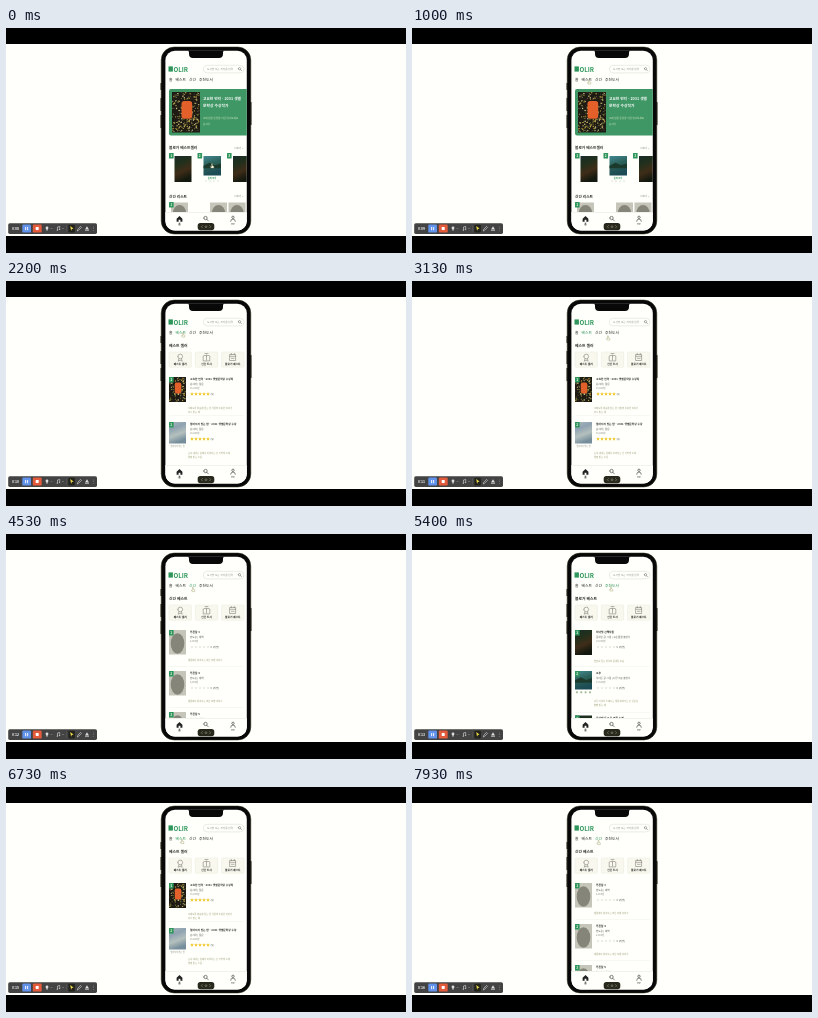
An HTML page that plays this animation: 400 px wide and 225 px high, repeating every 8000 ms.

```html
<!DOCTYPE html>
<html lang="ko">
<head>
<meta charset="utf-8">
<style>
html, body { margin: 0; width: 100%; height: 100%; overflow: hidden; background: #000; }
svg { display: block; width: 100vw; height: 100vh; font-family: "Noto Sans CJK KR", "Noto Sans CJK", "Noto Sans", sans-serif; }
</style>
</head>
<body>
<svg id="stage" viewBox="0 0 400 225"></svg>
<script>
const LOOP = 8000, PAPER = '#fffffb', INK = '#2b2b29', GREY = '#85857c', GREEN = '#2e965a';
const stage = document.getElementById('stage');

const rect = (x, y, w, h, fill, r = 0, extra = '') =>
  `<rect x="${x}" y="${y}" width="${w}" height="${h}" rx="${r}" fill="${fill}" ${extra}/>`;
const circle = (x, y, r, fill, extra = '') =>
  `<circle cx="${x}" cy="${y}" r="${r}" fill="${fill}" ${extra}/>`;
const line = (d, color = INK, width = .6) =>
  `<path d="${d}" fill="none" stroke="${color}" stroke-width="${width}" stroke-linecap="round" stroke-linejoin="round"/>`;
const text = (x, y, size, str, fill = INK, weight = 400, anchor = 'start') =>
  `<text x="${x}" y="${y}" font-size="${size}" fill="${fill}" font-weight="${weight}" text-anchor="${anchor}">${str}</text>`;
const group = (id, body, extra = '') => `<g id="${id}" ${extra}>${body}</g>`;
const magnifier = (x, y, r, color, width) =>
  line(`M${x - r} ${y}a${r} ${r} 0 1 0 ${2 * r} 0a${r} ${r} 0 1 0 ${-2 * r} 0M${x + r * .7} ${y + r * .7}l${r} ${r}`, color, width);

let seed = 7;
const random = () => (seed = seed * 16807 % 2147483647) / 2147483647;

// Book covers
function flowers(x, y, w, h) {
  let s = rect(x, y, w, h, '#1d1b13');
  for (let i = 0; i < w * h / 4; i++)
    s += circle(x + .6 + random() * (w - 1.2), y + .6 + random() * (h - 1.2), .3 + random() * .45,
      ['#b89c3d', '#71713b', '#d3c68b'][i % 3]);
  return s + rect(x + w * .34, y + h * .22, w * .38, h * .44, '#e3602a', w * .1);
}
const dusk = (x, y, w, h) => rect(x, y, w, h, 'url(#dusk)');
const lake = (x, y, w, h) => rect(x, y, w, h, 'url(#lake)') +
  `<path d="M${x} ${y + h * .5}l${w * .35} ${-h * .16}l${w * .3} ${h * .14}l${w * .35} ${-h * .1}v${h * .25}h${-w}z" fill="#1c3a2c"/>`;
const mist = (x, y, w, h) => rect(x, y, w, h, 'url(#mist)');
const sketch = (x, y, w, h) => rect(x, y, w, h, '#c5c5b9') +
  `<ellipse cx="${x + w * .5}" cy="${y + h * .55}" rx="${w * .4}" ry="${h * .42}" fill="#85857a"/>`;
const badge = (x, y, n) => rect(x, y, 4.6, 5.4, GREEN, .5) + text(x + 2.3, y + 4, 3.2, n, '#fff', 700, 'middle');

const star = (x, y, r) => {
  let d = '';
  for (let i = 0; i < 10; i++) {
    const a = i * Math.PI / 5, q = i % 2 ? r * .45 : r;
    d += `${i ? 'L' : 'M'}${(x + q * Math.sin(a)).toFixed(2)} ${(y - q * Math.cos(a)).toFixed(2)}`;
  }
  return d + 'z';
};
const stars = (y, full) => [0, 1, 2, 3, 4].map(i =>
  `<path d="${star(186 + i * 4, y, full ? 2 : 1.6)}" fill="${full ? '#f0ca32' : '#e6e6dc'}"/>`).join('');

// One row of a book list
function item(y, n, cover, coverHeight, title, author, price, full, notes, noteY) {
  return cover(163, y, 17, coverHeight) + badge(163, y, n) +
    text(184, y + 3.2, 2.7, title, INK, 700) +
    text(184, y + 7.8, 2.5, author, '#4c4c46') +
    text(184, y + 12.2, 2.4, price, GREY) +
    stars(y + 17, full) +
    text(204.5, y + 18, 2.6, full ? '(5)' : '0 (리뷰)', '#4c4c46') +
    notes.map((s, i) => text(182, noteY + i * 4, 2.3, s, '#97976f')).join('');
}
const divider = y => rect(163, y, 75, .3, '#e8e8de');

function filters() {
  const names = ['베스트 셀러', '신간 도서', '블로거 베스트'];
  return names.map((name, i) => {
    const x = 163 + i * 26.3, c = x + 11.2;
    const icon = [
      line(`M${c - 2.4} 75.5a2.4 2.4 0 1 0 4.8 0a2.4 2.4 0 1 0 -4.8 0M${c - 1.3} 78l-.7 2.2l2 -.9l2 .9l-.7 -2.2`, '#77776e', .55),
      line(`M${c} 74v5M${c - 3.3} 79.5v-4.5q2 -1.5 3.3 0q1.3 -1.5 3.3 0v4.5zM${c - 1.5} 72.5h3`, '#77776e', .55),
      line(`M${c - 2.8} 73.5h5.6v6h-5.6zM${c - 2.8} 75.3h5.6M${c - 1.4} 77.3h2.8M${c - 1.5} 72.4v1M${c + 1.5} 72.4v1`, '#77776e', .55)
    ][i];
    return rect(x, 71, 22.4, 15.2, '#f8f8ee', 1, 'stroke="#e6e6d8" stroke-width=".4"') + icon +
      text(c, 84.4, 2.7, name, INK, 600, 'middle');
  }).join('');
}
const listPage = (title, body) => text(163, 66.4, 3.8, title, INK, 700) + filters() + body;

const home =
  rect(163, 61, 80, 46.5, '#3f9765', 2) + flowers(166, 64, 28, 40.5) +
  text(197, 72.4, 3.7, '고요한 언덕 - 2031 샛별', '#fff', 700) +
  text(197, 78.8, 3.8, '문학상 수상작가', '#fff', 700) +
  text(197, 91.2, 2.5, '오래 남을 문장을 지금 만나보세요', '#dcecc0') +
  text(197, 97.4, 2.4, '윤서하', '#dcecc0') +
  text(163, 121, 3.7, '블로거 베스트셀러', INK, 700) + text(228.5, 120.6, 2.5, '더보기 &gt;', GREY) +
  dusk(168.5, 128, 17, 26) + badge(163, 125, 1) +
  lake(197.5, 128, 17.5, 19.5) + badge(191.5, 125, 2) +
  text(206, 150.7, 2.2, '숲의 오후', GREEN, 600, 'middle') +
  [200, 204, 208, 212].map(x => circle(x, 153, .6, '#b5c4a8')).join('') +
  dusk(227, 128, 17, 26) + badge(221, 125, 3) +
  text(163, 169.6, 3.7, '신간 리스트', INK, 700) + text(228.5, 169.2, 2.5, '더보기 &gt;', GREY) +
  [165, 204, 222.5].map(x => sketch(x, 174.5, 17, 20)).join('') + badge(163, 174, 1);

const best = listPage('베스트 셀러',
  item(96, 1, flowers, 25, '고요한 언덕 - 2031 샛별문학상 수상작', '윤서하 | 달문', '15,000원', true,
    ['오래도록 마음에 남는 한 사람의 조용한 이야기', '다시 읽는 책'], 127.8) + divider(134.5) +
  item(141, 2, mist, 21.5, '멀어지지 않는 밤 - 2031 샛별문학상 수상', '윤서하 | 달문', '16,800원', true,
    ['눈이 내리는 섬에서 이어지는 긴 기억의 노래', '밤에 읽는 소설'], 172.8) +
  text(171.5, 165.5, 2, '멀어지지 않는 밤', GREY, 400, 'middle'));

const fresh = listPage('신간 베스트', [0, 1, 2].map(i =>
  item(96 + i * 41, i + 1, sketch, 24.5, `푸른달 ${i + 3}`, '한도윤 | 새벽', '6,000원', false,
    ['계절마다 찾아오는 작은 모험 이야기'], 127 + i * 41) + divider(132.5 + i * 41)).join(''));

const picks = listPage('블로거 베스트',
  item(96, 1, dusk, 25, '저녁빛 산책자들', '문하린 글 그림 | 고운물결 출판사', '14,000원', false,
    ['천천히 걷는 하루의 풍경들 모음'], 127.5) + divider(132.5) +
  item(137, 2, lake, 18.5, '오후', '서이든 글 그림 | 나무그늘 출판사', '13,500원', false,
    ['나무 사이로 스며드는 빛을 따라가는 긴 산문집', '함께 읽는 책'], 168.3) +
  [165, 169.3, 173.6, 178].map(x => circle(x, 158.3, 1.1, '#a5b998')).join('') +
  divider(178) + item(181.5, 3, dusk, 20, '강가에 두고 온 여름 노래', '', '', false, [], 220));

const tabs = [['홈', 163], ['베스트', 169.5], ['신간', 183], ['추천도서', 193]];
const header =
  rect(162.5, 38.4, 4.4, 5.2, GREEN) + text(167.4, 43.6, 6.2, 'OLIR', GREEN, 900) +
  rect(197.3, 37.3, 40.7, 7.6, PAPER, 3.8, 'stroke="#d9d9cf" stroke-width=".5"') +
  text(201, 42.2, 2.6, '도서명 또는 저자를 입력', '#96968c') + magnifier(233.5, 40.7, 1.2, '#66665f', .5) +
  tabs.map(([name, x], i) =>
    `<text id="tab${i}" x="${x}" y="52.9" font-size="3.8" font-weight="500">${name}</text>`).join('');

const footer = rect(159, 184, 83, 20, PAPER) + rect(160, 184, 81, .4, '#deded4') +
  '<path d="M170.6 190.8l2.9 -2.8l2.9 2.8v3h-2v-2h-1.8v2h-2z" fill="#222"/>' +
  text(173.5, 197.4, 2.7, '홈', INK, 600, 'middle') +
  magnifier(199.5, 190, 1.7, '#333', .6) +
  circle(227, 189.3, 1.2, 'none', 'stroke="#333" stroke-width=".6"') + line('M224.7 193.3q0 -2.2 2.3 -2.2t2.3 2.2', '#333') +
  text(227, 197.2, 2.7, 'MY', INK, 500, 'middle');

const sideButtons = [[154.5, 55, 7], [154.5, 70, 13], [154.5, 87, 13], [243.8, 74, 23]];
const phone = sideButtons.map(([x, y, h]) => rect(x, y, 1.7, h, '#23231a', .6)).join('') +
  rect(155.2, 19, 89.6, 187, '#080808', 13, 'stroke="#33331f" stroke-width=".5"') +
  rect(159.4, 22.8, 81.4, 179.8, PAPER, 9.5);

const notch = '<path d="M181 22.5h38q-2 0 -2 2v1.5q0 4 -4 4h-26q-4 0 -4 -4v-1.5q0 -2 -2 -2z" fill="#080808"/>';
const pill = rect(191.7, 195, 16.6, 7.2, '#28281d', 2.6) + line('M196.5 197.5l-1.2 1.2l1.2 1.2M203.5 197.5l1.2 1.2l-1.2 1.2', '#a5a58c', .5) +
  circle(200, 198.7, .9, 'none', 'stroke="#a5a58c" stroke-width=".5"');

const recorder = rect(2.2, 195.3, 88.8, 10.6, '#434343', 1.6) +
  '<text id="clock" x="6" y="201.8" font-size="3.4" fill="#fff" font-weight="600"></text>' +
  rect(16.3, 196.6, 8.7, 8, '#6192ea', 1.2) + rect(19.2, 199, .9, 3.2, '#fff') + rect(21.2, 199, .9, 3.2, '#fff') +
  rect(26.8, 196.6, 8.9, 8, '#e45b3c', 1.2) + rect(29.7, 199, 3, 3, '#fff', .4) +
  circle(41, 199.9, 1.4, '#ddd') + rect(40.4, 201, 1.2, 1.6, '#ddd') + line('M44.8 200.3l.7 .7l.7 -.7', '#aaa', .4) +
  line('M51.5 202.2v-3.2l2.2 -.6v3.2M51 202.2h.5M53.2 201.6h.5', '#ddd', .6) + line('M56.3 200.3l.7 .7l.7 -.7', '#aaa', .4) +
  rect(60, 197.5, .4, 6, '#666') + rect(62.3, 196.7, 6.6, 7.8, '#23231d', 1) +
  '<path d="M64.2 198l3.4 2.6l-1.7 .3l-.8 1.8z" fill="#ead64a"/>' +
  line('M71.5 202.6l.4 -1.5l2.6 -2.7l1 1l-2.7 2.7z', '#ddd', .6) +
  '<path d="M81 198.3l2 3.3h-4z" fill="#ddd"/>' + rect(79, 202.2, 4, .6, '#ddd') +
  [199, 200.7, 202.4].map(y => circle(87.3, y, .4, '#aaa')).join('');

const gradient = (id, colors) => `<linearGradient id="${id}" x2=".3" y2="1">` +
  colors.map((c, i) => `<stop offset="${i / (colors.length - 1)}" stop-color="${c}"/>`).join('') + '</linearGradient>';

const pages = { home, best, fresh, picks };
stage.innerHTML =
  '<defs><clipPath id="screen"><rect x="159.4" y="22.8" width="81.4" height="179.8" rx="9.5"/></clipPath>' +
  gradient('dusk', ['#1a2d29', '#20301c', '#3f2d18', '#14190f']) +
  gradient('lake', ['#448a94', '#2b6058', '#1c4b55']) +
  gradient('mist', ['#a8b8ba', '#8fa2b1', '#b4c0bd', '#768e9c']) + '</defs>' +
  rect(0, 16, 400, 192, PAPER) + phone +
  group('app', Object.entries(pages).map(([id, body]) => group(id, body)).join('') + header + footer, 'clip-path="url(#screen)"') +
  group('loader', [0, 1, 2].map(i => circle(196.2 + i * 3.7, 108, 1.2, '#2fa35c')).join('')) +
  notch + pill + recorder +
  group('cursor', '<path d="M-.4 -2.2q.7 -.5 .8 .4v1.6l1.4 .5v1.8h-2.6l-.9 -1.5l1.3 .1z" fill="#fffff0" stroke="#99996c" stroke-width=".4"/>');

const $ = id => document.getElementById(id);
const dots = [...$('loader').children];
// Only the first list needs loading; later pages switch at once
const scenes = [[0, 'home', 0], [1200, 'loader'], [2070, 'best', 1], [4400, 'fresh', 2],
  [5400, 'picks', 3], [6730, 'best', 1], [7730, 'fresh', 2]];
// Cursor moves: start, end, x, y
const moves = [[0, 0, 206, 138], [470, 1000, 177, 54], [2470, 3130, 196, 57], [3600, 4200, 186.5, 55.5],
  [4470, 5000, 199, 55], [5870, 6400, 176, 54.5], [6800, 7330, 186.5, 55.5]];

function cursorAt(t) {
  let [, , x, y] = moves[0];
  for (const [start, end, nx, ny] of moves.slice(1)) {
    const p = Math.min(1, Math.max(0, (t - start) / (end - start))), e = p * p * (3 - 2 * p);
    x += (nx - x) * e;
    y += (ny - y) * e;
  }
  return `translate(${x} ${y})`;
}

function draw(now) {
  const t = now % LOOP;
  const [, page, active] = scenes.findLast(s => s[0] <= t);
  const show = (id, on) => $(id).style.display = on ? '' : 'none';
  show('app', page !== 'loader');
  show('loader', page === 'loader');
  Object.keys(pages).forEach(id => show(id, id === page));
  tabs.forEach((_, i) => $('tab' + i).setAttribute('fill', i === active && i ? GREEN : INK));
  dots.forEach((dot, i) => {
    const wave = .5 + .5 * Math.cos(2 * Math.PI * ((t - 1670) / 900 + .08 - i * .16));
    dot.setAttribute('r', .8 + .4 * wave);
    dot.setAttribute('opacity', .3 + .7 * wave);
  });
  $('cursor').setAttribute('transform', cursorAt(t));
  $('clock').textContent = '0:' + String(Math.floor(8.4 + t / 1000)).padStart(2, '0');
  requestAnimationFrame(draw);
}
draw(0);
</script>
</body>
</html>
```
